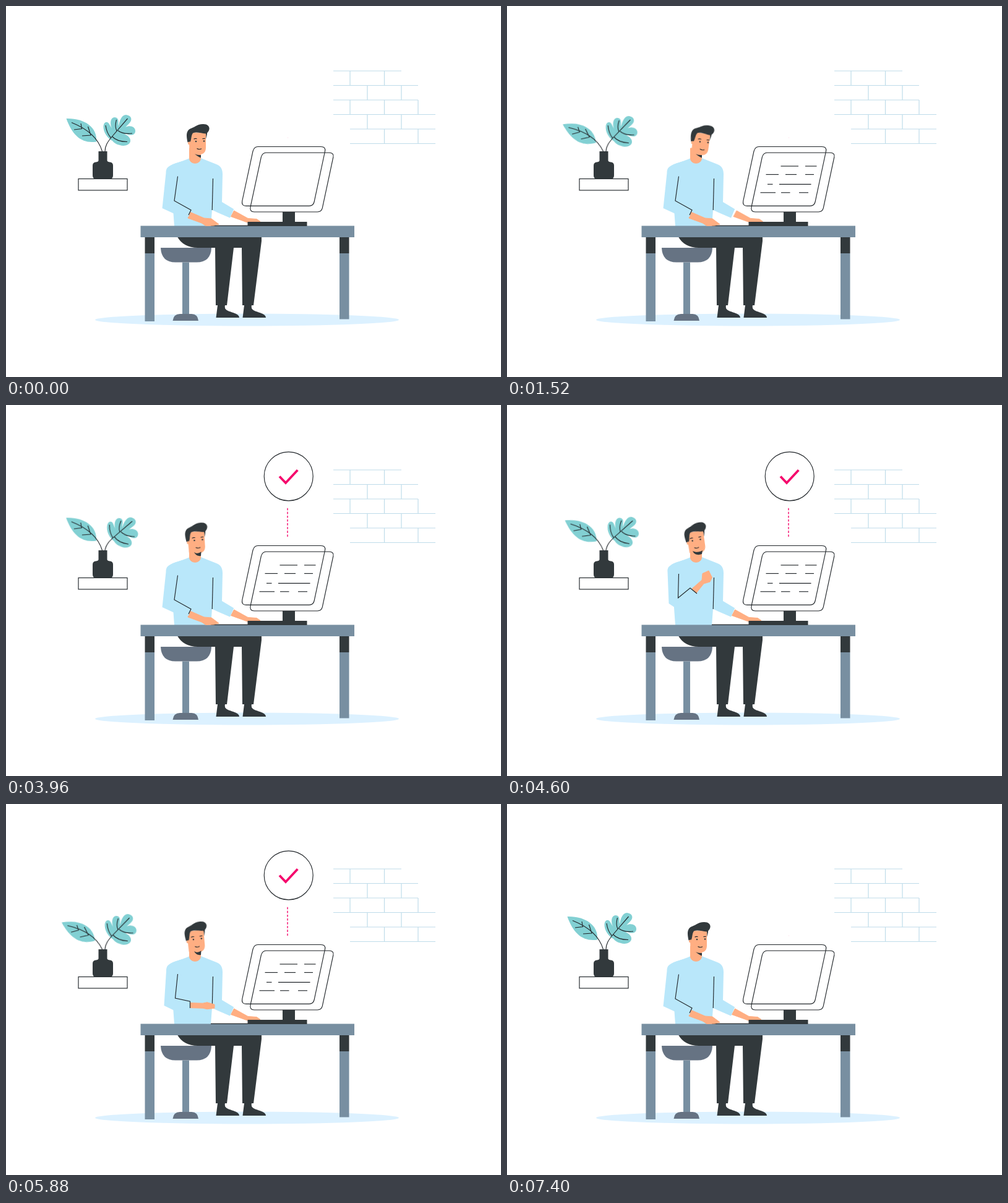
An HTML page for the animation above (7.44 s loop, 800x600 px).

```html
<!DOCTYPE html>
<html lang="en">
<head>
<meta charset="utf-8">
<title>Desk</title>
<style>
  html, body { margin: 0; width: 100%; height: 100%; overflow: hidden; background: #fff; }
  svg { display: block; width: 800px; height: 600px; }

  .dark { fill: #32393c; }
  .steel { fill: #788fa1; }
  .slate { fill: #667383; }
  .shirt { fill: #b9e7fa; }
  .skin { fill: #ffae82; stroke: #ffae82; stroke-linejoin: round; }
  .teal { fill: #82d0d3; }
  .ink { fill: none; stroke: #22272b; stroke-width: 1.15; }
  .pink { fill: none; stroke: #f5096c; }
  .brick { fill: none; stroke: #bfdcea; stroke-width: 1.2; }

  .leaf-a, .leaf-b, .head, .face, .arm, .hand, .line, .stem, .badge, .tick, .ring, .beard {
    animation: 7.44s ease-in-out infinite;
  }

  /* plant */
  .leaf-a, .leaf-b { animation-timing-function: cubic-bezier(.37, 0, .63, 1); animation-direction: alternate; }
  .leaf-a { transform-origin: 155px 235px; animation-name: sway-a; animation-duration: 1.86s; }
  .leaf-b { transform-origin: 160px 235px; animation-name: sway-b; animation-duration: 3.72s; }
  @keyframes sway-a { to { transform: rotate(-9.5deg); } }
  @keyframes sway-b { to { transform: rotate(8.7deg); } }

  /* head */
  .head { transform-origin: 306px 248px; animation-name: nod; }
  @keyframes nod {
    0%, 8%, 87%, 100% { transform: rotate(0deg); }
    20.4%, 23% { transform: rotate(7.7deg); }
    37.1% { transform: rotate(-1.5deg); }
    53.2% { transform: rotate(-3.8deg); }
    61.8%, 72% { transform: rotate(-8deg); }
    79% { transform: rotate(-5deg); }
  }
  .face { animation-name: turn; }
  @keyframes turn {
    0%, 8%, 87%, 100% { transform: translateX(0); }
    20.4%, 23% { transform: translateX(1px); }
    37.1% { transform: translateX(-.3px); }
    53.2% { transform: translateX(-.6px); }
    61.8%, 72% { transform: translateX(-3.3px); }
    79% { transform: translateX(-1.6px); }
  }
  .beard { animation-name: beard; }
  @keyframes beard {
    0%, 37.1%, 87%, 100% { d: path("M305 239C308 241 312 241 315 241L315 245.5C311 244 307 241 305 239Z"); }
    53.2%, 79% { d: path("M304 238C308 241 312 240 315.5 237L315 244C310 245 306 242 304 238Z"); }
    61.8%, 72% { d: path("M300 236C305 239 312 238 316 235L315 241C310 243 303 243 300 236Z"); }
  }

  /* raised arm: rest, mid-swing and fist at the chest */
  .sleeve { animation-name: sleeve; }
  @keyframes sleeve {
    0%, 53.2%, 81.7%, 100% { d: path("M285 251C262 258 259 260 258.5 270L252.5 327L272 336L295 341L299 330L272 315L285 270Z"); animation-timing-function: ease-in; }
    57.5%, 79.03% { d: path("M285 251C262 258 259.5 260 259 270L255.5 326L272 334L297.5 331L297.5 319L273.5 314L285 270Z"); animation-timing-function: ease-out; }
    61.8%, 72.6% { d: path("M285 251C264 258 259 260 259.5 270L261.5 321L272 328L307 305L296 296L276.5 312L285 270Z"); animation-timing-function: ease-in; }
  }
  .crease { animation-name: crease; }
  @keyframes crease {
    0%, 53.2%, 81.7%, 100% { d: path("M277.5 275.5L272 315L299 330L295 338"); animation-timing-function: ease-in; }
    57.5%, 79.03% { d: path("M277.5 275L273.5 314L297.5 319L297.5 330"); animation-timing-function: ease-out; }
    61.8%, 72.6% { d: path("M277.5 273L276.5 312L296 296L307 305"); animation-timing-function: ease-in; }
  }
  .fist { animation-name: fist; }
  @keyframes fist {
    0%, 53.2%, 81.7%, 100% { d: path("M297 333L320 343L332 344L344 353L336 355L323 355.5L316 351L294 343Z"); animation-timing-function: ease-in; }
    55.9% { d: path("M297 328L320 333L334 332L351 338L344 341L325 342L318 340L296 338Z"); animation-timing-function: linear; }
    57.5%, 79.03% { d: path("M297 321.5L318 322L325 320.5L337 324L337 330L325 331.5L318 330L297 329.5Z"); animation-timing-function: ease-out; }
    61.8%, 72.6% { d: path("M299 297L315 283L316 272.5L326 268L331.5 279L328 286L318 289L306 304Z"); animation-timing-function: ease-in; }
  }

  /* hand on the desk */
  .hand { animation-name: slide; }
  @keyframes slide {
    0%, 11%, 30%, 100% { transform: translateX(0); }
    16% { transform: translateX(5px); }
    20.4% { transform: translateX(2.5px); }
    25% { transform: translateX(4px); }
  }

  /* text lines on the screen */
  .line { stroke-dasharray: 1 2; animation-name: write; animation-delay: calc(var(--i) * .18s); animation-fill-mode: backwards; }
  @keyframes write {
    0% { stroke-dashoffset: 1; }
    2.5%, 79.5% { stroke-dashoffset: 0; }
    81.7%, 100% { stroke-dashoffset: -1; }
  }

  /* approval badge */
  .stem { stroke-dasharray: 3.6 2.5; animation-name: rise; }
  @keyframes rise {
    0%, 20.97%, 90%, 100% { d: path("M455 213L455 213"); }
    23.7%, 86% { d: path("M455 213L455 166.5"); }
  }
  .badge { transform-origin: 456.7px 115.3px; animation-name: pop; }
  @keyframes pop {
    0%, 22.5%, 87%, 100% { transform: scale(0); }
    28%, 80.6% { transform: scale(1); }
  }
  .tick { stroke-dasharray: 1 2; animation-name: tick; }
  @keyframes tick {
    0%, 26%, 86%, 100% { stroke-dashoffset: 1; }
    30.6%, 80.6% { stroke-dashoffset: 0; }
  }
  .ring { animation-name: pulse; }
  @keyframes pulse {
    0%, 31%, 51.1%, 100% { r: 39px; visibility: hidden; }
    31.1% { r: 39px; visibility: visible; animation-timing-function: ease-out; }
    41.1% { r: 60.5px; visibility: visible; }
    51% { r: 39px; visibility: visible; }
  }
</style>
</head>
<body>
<svg viewBox="0 0 800 600">
  <ellipse cx="389.5" cy="507.5" rx="245.5" ry="10" fill="#dcf1ff"/>

  <g class="brick">
    <path d="M529 105H639M529 128.5H666M529 152H666M529 175.5H694M556 199H694M556 222.5H694"/>
    <path d="M556 105V128.5M611.5 105V128.5M584 128.5V152M639 128.5V152M556 152V175.5M611.5 152V175.5M666 152V175.5M584 175.5V199M639 175.5V199M611.5 199V222.5M666 199V222.5"/>
  </g>

  <!-- plant -->
  <g class="leaf-a">
    <path class="teal" d="M97.5 182C125 181 148 195 146 219.5C122 223 107 209 97.5 182Z"/>
    <path class="ink" d="M106 188.5C130 198 149 213 155.5 235M121 190L122.5 198.5L110 200M132.5 195L137 209L123 210"/>
  </g>
  <g class="leaf-b">
    <path class="teal" d="M172 218C164 214 157 204 157.5 194C158.5 186 165 186 168 193L171 198C168 191 168 181 175 180C181 180 182 184 181.500 191L182 195C183 188 186 176 194 176C203 177 205 184 199 190L193 196C200 192 209 195 209 202C209 209 202 210 195 207L191 207C197 209 202 214 201 219C199 226 190 227 184 225C179 224 174 221 172 218Z"/>
    <path class="ink" d="M160 235C160 226 164 220 171.500 211L196.500 182M161 193C162 201 164 207 169.500 213M178.500 184C176.500 191 177 198 179 202M204 206C196 207 188 207 181 201.500M196 219.500C187 219.500 177 217 171.500 211"/>
  </g>
  <path class="dark" d="M149.500 235H163.500V250Q164 252 168 252.500Q173 253 173 258V274Q173 279.500 168 279.500H145Q140 279.500 140 274V258Q140 253 145 252.500Q149 252 149.500 250Z"/>
  <rect class="ink" x="117" y="279.500" width="79" height="18.500"/>

  <!-- stool and legs -->
  <path class="slate" d="M250 391H332Q331 414.500 308 414.500H274Q251 414.500 250 391Z"/>
  <path class="steel" d="M285 414.500H296V498H285Z"/>
  <path class="slate" d="M269.500 509Q271 498 281 498H300Q309.500 498 311 509Z"/>
  <g class="dark">
    <path d="M277 373.500H413V380L400 484H382L381 391H368L357 484H339L338 391H310C294 391 283 384 277 373.500Z"/>
    <path id="shoe" d="M342 484H354Q352.500 489 357 492C364 496 377 497 377 504H339.500Z"/>
    <use href="#shoe" x="43"/>
  </g>

  <!-- body -->
  <path class="shirt" d="M297 246C285 252 270 254 265 259L272 356H331L333 330L362 342.500L368 328.500L349 317.500L350 272C350 265 348 259 340 256L315 246Z"/>
  <path class="skin" d="M296.500 230H314.500V246C314.500 257 296.500 257 296.500 246Z"/>
  <path class="ink" d="M334.500 279L333.200 330"/>
  <path class="skin hand" d="M368.500 331L391 343.500L405 344.500L411 348.500L404 350H390L363.500 340.500Z"/>
  <path class="shirt" d="M349 317L368 328.500L362 342.500L340 333Z"/>

  <g class="head">
    <path class="skin" d="M299 205L322.500 206V229C322.500 236 319 240 312 239.500L297 238L296.500 215Z"/>
    <path class="dark" d="M293.500 220.500C291 209 291 201 299 198C307 195 309 191 318 191C327 190.500 330 196 328 201C327 204 325 204 325 207L323.500 215L323 206.500C315 206 308 203 302 205.500C299 210 300 214 298 219.500Z"/>
    <circle cx="296.300" cy="222" r="2.400" fill="#ffae82"/>
    <g class="face">
      <circle class="dark" cx="307" cy="219" r="1.250"/>
      <circle class="dark" cx="320" cy="218.500" r="1.250"/>
      <path class="ink" stroke-width="1" d="M303.500 215.200Q306 213.800 308.500 214.800M317.500 214.600L322 214.300M308.500 230.500Q312 232.800 316 230.800"/>
    </g>
  </g>
  <path class="dark beard" d="M305 239C308 241 312 241 315 241L315 245.500C311 244 307 241 305 239Z"/>

  <!-- desk -->
  <path class="steel" d="M224.500 400H240V510H224.500ZM539 400H554.500V506.500H539Z"/>
  <path class="dark" d="M224.500 373H240V400H224.500ZM539 373H554.500V400H539Z"/>
  <rect class="steel" x="217.500" y="355.500" width="345.500" height="18.500"/>
  <path class="ink" d="M331 355.300H391"/>

  <path class="skin arm fist" d="M297 333L320 343L332 344L344 353L336 355L323 355.500L316 351L294 343Z"/>
  <path class="shirt arm sleeve" d="M285 251C262 258 259 260 258.500 270L252.500 327L272 336L295 341L299 330L272 315L285 270Z"/>
  <path class="ink arm crease" d="M277.500 275.500L272 315L299 330L295 338"/>

  <!-- monitor -->
  <path class="dark" d="M447 333H467V349H486.500V356H390.500V349H447Z"/>
  <g class="ink">
    <path id="pane" d="M407 227.500H509Q517 227.500 515.500 235L498 317Q496.500 323.300 490 323.300H388Q380 323.300 381.800 315L399 235Q401 227.500 407 227.500Z"/>
    <use href="#pane" x="13.300" y="9.700"/>
  </g>
  <g class="ink" stroke-width="1.300">
    <g style="--i:0">
      <path class="line" pathLength="1" d="M442.500 259H471"/>
      <path class="line" pathLength="1" d="M482 259H500.500"/>
    </g>
    <g style="--i:1">
      <path class="line" pathLength="1" d="M418.500 272.500H439"/>
      <path class="line" pathLength="1" d="M450 272.500H468"/>
      <path class="line" pathLength="1" d="M482 272.500H496"/>
    </g>
    <g style="--i:2">
      <path class="line" pathLength="1" d="M421 288.300H429.500"/>
      <path class="line" pathLength="1" d="M440 288.300H491.500"/>
    </g>
    <g style="--i:3">
      <path class="line" pathLength="1" d="M409.500 301.800H434"/>
      <path class="line" pathLength="1" d="M443 301.800H457.500"/>
      <path class="line" pathLength="1" d="M472 301.800H487"/>
    </g>
  </g>

  <!-- badge -->
  <path class="pink stem" stroke-width="1.400" d="M455 213L455 166.500"/>
  <circle class="pink ring" cx="456.700" cy="115.300" r="39" stroke-width="1.200"/>
  <g class="badge">
    <circle class="ink" cx="456.700" cy="115.300" r="39.500"/>
    <path class="pink tick" pathLength="1" stroke-width="3.800" d="M442 115.500L452 126L471.300 105.300"/>
  </g>
</svg>
</body>
</html>
```
